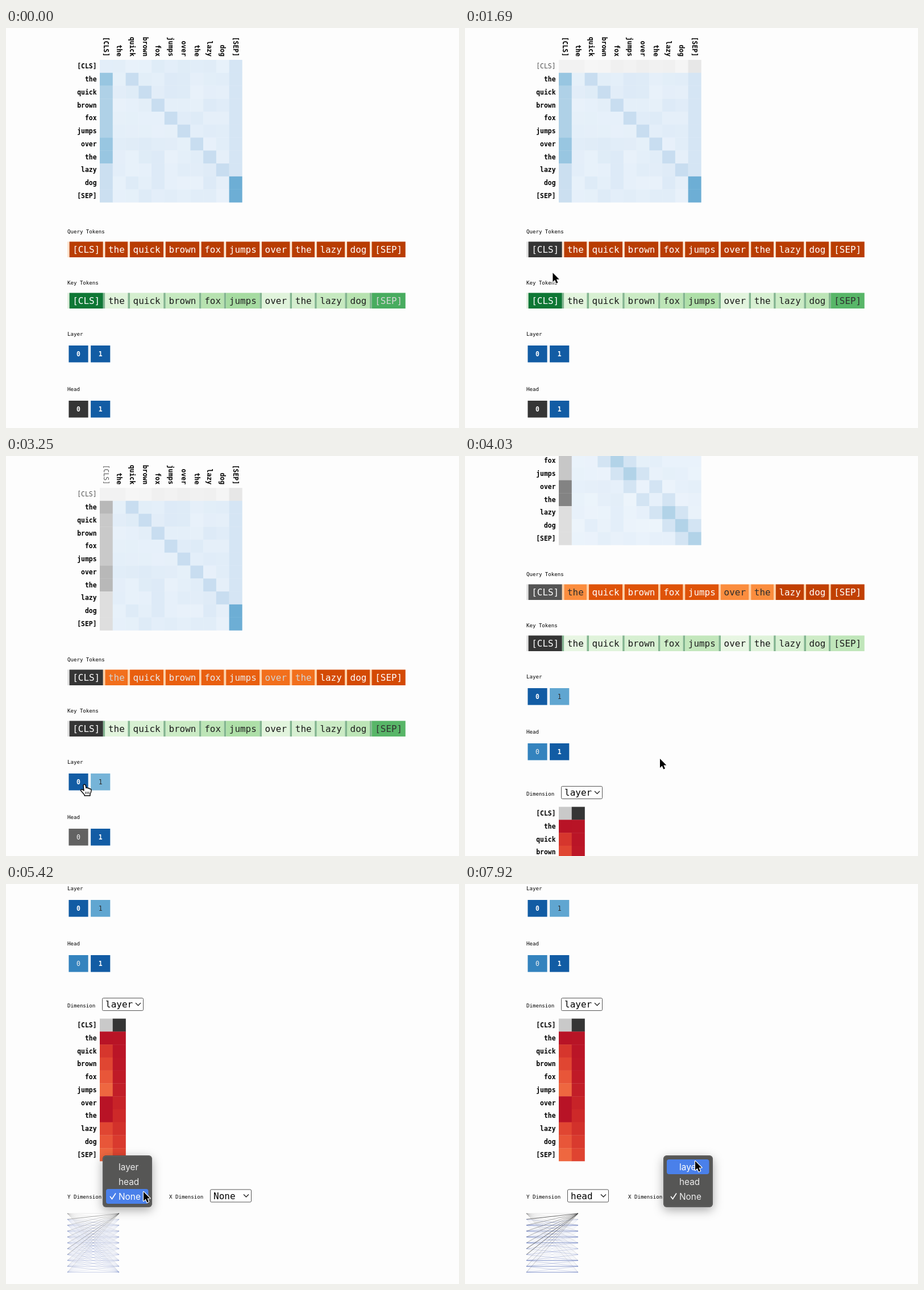
Write an HTML page with a canvas that moves like this. It is 797 by 703 pixels and loops after 8000 ms.

```html
<!DOCTYPE html>
<html lang="en">
<head>
<meta charset="utf-8">
<title>Attention explorer</title>
<style>
  html, body { margin: 0; width: 100%; height: 100%; overflow: hidden; background: #fdfdfd; }
  canvas { display: block; }
</style>
</head>
<body>
<canvas id="stage" width="797" height="703"></canvas>
<script>
const ctx = document.getElementById('stage').getContext('2d');
const LOOP = 8000, CELL = 22.76, MAX = 0.83;
const TOKENS = '[CLS] the quick brown fox jumps over the lazy dog [SEP]'.split(' ');
const LAST = TOKENS.length - 1;
const MONO = '"DejaVu Sans Mono", monospace';

// Colour scales, interpolated with a uniform B-spline
const SCALES = Object.fromEntries(Object.entries({
  blue: 'f7fbff deebf7 c6dbef 9ecae1 6baed6 4292c6 2171b5 08519c 08306b',
  green: 'f7fcf5 e5f5e0 c7e9c0 a1d99b 74c476 41ab5d 238b45 006d2c 00441b',
  orange: 'fff5eb fee6ce fdd0a2 fdae6b fd8d3c f16913 d94801 a63603 7f2704',
  red: 'd9ef8b ffffbf fee08b fdc776 fdae61 f46d43 d73027 a50026 8a0020',
  grey: 'ffffff f0f0f0 d9d9d9 bdbdbd 969696 737373 525252 252525 000000'
}).map(([name, stops]) => [name, stops.split(' ').map(hex =>
  [0, 2, 4].map(k => parseInt(hex.slice(k, k + 2), 16)))]));

function shade(name, v) {
  const stops = SCALES[name], k = Math.min(7, Math.floor(v * 8)), u = v * 8 - k;
  const channel = c => {
    const b = stops[k][c], d = stops[k + 1][c];
    const a = k ? stops[k - 1][c] : 2 * b - d, e = k < 7 ? stops[k + 2][c] : 2 * d - b;
    return Math.round(((1 - u) ** 3 * a + (4 - 6 * u * u + 3 * u ** 3) * b
      + (1 + 3 * u + 3 * u * u - 3 * u ** 3) * d + u ** 3 * e) / 6);
  };
  return `rgb(${[0, 1, 2].map(channel)})`;
}

function textShade(v) {
  const g = v < 0.595 ? 15 + v * 60 : Math.min(255, 205 + (v - 0.595) * 420);
  return `rgb(${g},${g},${g})`;
}

const noise = (a, b) => { const s = Math.sin(a * 12.99 + b * 78.23) * 43758.5; return s - Math.floor(s); };
const isFunctionWord = i => ['the', 'over'].includes(TOKENS[i]);
const clausePlace = i => i < 6 ? i - 1 : i - 6;

// How much each token attends to the first one
function sink(i, both) {
  if (!i) return both ? .3 : .1;
  if (i > 7) return .22;
  return isFunctionWord(i) ? (both ? .57 : .385) : (both ? .33 : .32);
}

// One head looks at the next token; together they also look at the token itself and its neighbours
function oneHead(i, j) {
  if (!j) return sink(i, false);
  if (j === LAST) return i > 8 ? .5 : .17;
  return i && j === i + 1 ? .23 : .075 + .06 * noise(i + 1, j);
}
function bothHeads(i, j) {
  if (!j) return sink(i, true);
  if (i && j === i && !isFunctionWord(i)) return .31;
  return i && Math.abs(i - j) === 1 ? .18 : .055 + .05 * noise(i + 1, j);
}

const queryValue = (i, both) => Math.min(MAX, (both ? 1 : .945) - .88 * sink(i, both));
function keyValue(i, both) {
  if (!i) return MAX;
  if (i === LAST) return both ? .27 : .57;
  return both ? .1 + .04 * clausePlace(i) : .13 + .05 * clausePlace(i);
}
function layerValue(i, layer) {
  if (!i) return layer ? MAX : .32;
  if (layer) return MAX - .0012 * i * i;
  return isFunctionWord(i) ? MAX : .775 - .034 * clausePlace(i);
}

// Pointer stops: place and time of arrival; a repeated place is a pause
const PLACE = {
  start: [180, 425], queryCls: [157, 384], keyCls: [152, 474], keyQuick: [245, 476],
  layer0: [138, 577], head0: [132, 662], blank: [343, 532],
  ySelect: [242, 541], headItem: [243, 516], xSelect: [412, 542], layerItem: [405, 487]
};
const STOPS = Object.entries({
  20: 'start', 250: 'queryCls', 560: 'keyCls', 840: 'keyQuick', 1250: 'keyCls', 2150: 'queryCls',
  2650: 'queryCls', 2910: 'keyCls', 3250: 'layer0', 3430: 'head0', 3800: 'blank', 4760: 'blank',
  5150: 'ySelect', 5480: 'ySelect', 5900: 'headItem', 6800: 'xSelect', 7350: 'xSelect', 7850: 'layerItem'
}).map(([time, name]) => [+time, PLACE[name]]);

const smooth = p => { p = Math.max(0, Math.min(1, p)); return p * p * (3 - 2 * p); };
const within = (t, from, to) => t >= from && t < to;

function pointerAt(t) {
  const k = STOPS.findIndex(([time]) => time > t);
  if (k < 1) return STOPS.at(k)[1];
  const [t0, from] = STOPS[k - 1], [t1, to] = STOPS[k];
  const e = smooth((t - t0) / (t1 - t0));
  return from.map((a, n) => a + (to[n] - a) * e);
}

function text(str, x, y, size, color = '#000', { bold, align = 'left', family = MONO } = {}) {
  ctx.font = `${bold ? 'bold ' : ''}${size}px ${family}`;
  ctx.textAlign = align;
  ctx.fillStyle = color;
  ctx.fillText(str, x, y);
}
const caption = (str, x, y) => text(str, x, y, 9.1);

function rect(x, y, w, h, color) {
  ctx.fillStyle = color;
  ctx.fillRect(x, y, w, h);
}

function rounded(x, y, w, h, r, fill, stroke) {
  ctx.beginPath();
  ctx.roundRect(x, y, w, h, r);
  ctx.fillStyle = fill;
  ctx.fill();
  if (stroke) { ctx.strokeStyle = stroke; ctx.lineWidth = 1; ctx.stroke(); }
}

function polyline(points, color, width) {
  ctx.beginPath();
  points.forEach(([x, y]) => ctx.lineTo(x, y));
  ctx.strokeStyle = color;
  ctx.lineWidth = width;
  ctx.stroke();
}

function label(token, x, y, off) {
  text(token, x, y, 11.4, off ? '#555' : '#000', { bold: !off, align: 'right' });
}
const rowLabels = (top, firstOff) =>
  TOKENS.forEach((token, i) => label(token, 159.5, top + (i + .5) * CELL + 4, firstOff && !i));
const cell = (i, j, top, color) =>
  rect(165 + j * CELL, top + i * CELL, CELL + .3, CELL + .3, color);

function heatmap(weight, queryOff, keyOff) {
  rowLabels(56, queryOff);
  TOKENS.forEach((token, j) => {
    ctx.save();
    ctx.translate(165 + (j + .5) * CELL - 4, 50);
    ctx.rotate(Math.PI / 2);
    label(token, 0, 0, keyOff && !j);
    ctx.restore();
    TOKENS.forEach((_, i) => {
      const grey = (queryOff && !i) || (keyOff && !j);
      cell(i, j, 56, shade(grey ? 'grey' : 'blue', weight(i, j)));
    });
  });
}

function tokenRow(y, scale, valueOf, firstOff, borderOf) {
  let x = 108;
  TOKENS.forEach((token, i) => {
    const v = valueOf(i), w = token.length * 9.6 + 14.8, off = firstOff && !i;
    rect(x, y, 3.6, 27.5, off ? '#e2e2e2' : borderOf(i));
    rect(x + 3.6, y, w - 3.6, 27.5, shade(off ? 'grey' : scale, v));
    text(token, x + 9.2, y + 19, 15.94, textShade(v));
    x += w;
  });
}

function buttons(y, values, firstOff) {
  values.forEach((v, i) => {
    const x = 110.4 + i * 38.7;
    rect(x, y, 34.2, 29.6, shade(firstOff && !i ? 'grey' : 'blue', v));
    text(i, x + 17.1, y + 18.8, 11.4, textShade(v), { bold: v > .75, align: 'center' });
  });
}

function select(x, y, value) {
  rounded(x + .5, y + .5, 72, 22, 2, '#fff', '#555');
  text(value, x + 6, y + 17.3, 16);
  polyline([[x + 59, y + 9], [x + 63.5, y + 13.5], [x + 68, y + 9]], '#222', 1.3);
}

function menu(x, pointerY) {
  const y = 477;
  ctx.save();
  ctx.shadowColor = 'rgba(0,0,0,.34)';
  ctx.shadowBlur = 18;
  ctx.shadowOffsetY = 5;
  rounded(x, y, 87, 91, 6, '#3c3c3c');
  ctx.restore();
  rounded(x + 1, y + 1, 85, 89, 5, '#565655', '#6c6c6c');
  const active = Math.max(0, Math.min(2, Math.floor((pointerY - 484) / 26)));
  rounded(x + 6, y + 7 + active * 26, 74.5, 26, 4, '#4a80ea');
  ['layer', 'head', 'None'].forEach((item, i) =>
    text(item, x + 28, y + 25.5 + i * 26, 15.4, i === active ? '#fff' : '#ececec', { family: 'Inter, sans-serif' }));
  polyline([[x + 13, 549], [x + 16.5, 553.5], [x + 23, 543.5]], '#fff', 1.6);
}

function connections(grouped) {
  const top = 1109, step = 10.33;
  TOKENS.forEach((_, i) => TOKENS.forEach((_, j) => {
    const w = bothHeads(i, j), grey = !i || !j;
    let alpha = grouped ? Math.max(.04, (w - .1) * 3.2) : w + (j === LAST ? .1 : .03);
    if (grey) alpha = i ? w * (grouped ? 1.25 : .9) : .13;
    polyline([[108, top + i * step], [199, top + j * step]],
      `rgba(${grey ? '60,60,60' : '75,100,180'},${Math.min(.8, alpha)})`, grouped ? 1 : .75);
  }));
}

const HAND = new Path2D('M-2 1.5Q0-1 2 1.5L3 6.5Q5 5 6 7Q8 6 9 8Q12 7.5 12 10.5Q12 14 10 16.5V20H0V18.5Q-2 16-6.5 11Q-6.5 8-3 9.5L-1 11Z');
const KNUCKLES = new Path2D('M2.2 13V17M5 13V17M7.8 13V17');
const ARROW = new Path2D('M0 0V16L3.7 12.4L6.3 18.4L9 17.2L6.4 11.4H11.4Z');

function pointer(x, y, scroll) {
  const pageY = y + scroll;
  const overRow = x > 108 && x < 703 && (within(pageY, 375, 403) || within(pageY, 465, 493));
  const overButton = x > 110 && x < 183 && (within(pageY, 558, 588) || within(pageY, 655, 685));
  ctx.save();
  ctx.translate(x, y);
  ctx.lineJoin = 'round';
  if (overRow || overButton) {
    ctx.fillStyle = '#fff';
    ctx.strokeStyle = '#000';
    ctx.lineWidth = 1.4;
    ctx.fill(HAND);
    ctx.stroke(HAND);
    ctx.lineWidth = 1;
    ctx.stroke(KNUCKLES);
  } else {
    ctx.strokeStyle = '#fff';
    ctx.lineWidth = 2.4;
    ctx.stroke(ARROW);
    ctx.fillStyle = '#000';
    ctx.fill(ARROW);
  }
  ctx.restore();
}

function draw(t) {
  const queryOff = within(t, 280, 2150) || t >= 2650;
  const keyOff = within(t, 560, 1250) || t >= 2910;
  const both = t >= 3440;
  const grouped = t >= 5950;
  const scroll = Math.round(530 * smooth((t - 3650) / 1086));
  const [px, py] = pointerAt(t);

  rect(0, 0, 797, 703, '#fdfdfd');
  ctx.save();
  ctx.translate(0, -scroll);
  heatmap(both ? bothHeads : oneHead, queryOff, keyOff);

  caption('Query Tokens', 108, 361);
  tokenRow(375.5, 'orange', i => keyOff ? queryValue(i, both) : MAX, queryOff,
    () => keyOff ? '#fdd0a6' : '#fce4d0');
  caption('Key Tokens', 108, 451);
  tokenRow(465.5, 'green', i => Math.min(MAX, keyValue(i, both) * (queryOff ? 1 : 1.08)), keyOff,
    i => !i ? '#e2efdf' : '#83b590');

  caption('Layer', 108, 541);
  buttons(558, [MAX, !keyOff ? MAX : both ? .535 : .475]);
  caption('Head', 108, 638);
  buttons(655, [both ? .68 : keyOff ? .69 : MAX, MAX], !both);

  caption('Dimension', 108, 746.5);
  select(169, 730, 'layer');
  rowLabels(766.6, false);
  TOKENS.forEach((_, i) => [0, 1].forEach(layer =>
    cell(i, layer, 766.6, shade(i ? 'red' : 'grey', layerValue(i, layer)))));

  caption('Y Dimension', 108, 1083);
  select(180, 1066.5, grouped ? 'head' : 'None');
  caption('X Dimension', 287, 1083);
  select(359, 1066.5, 'None');
  connections(grouped);
  ctx.restore();

  if (within(t, 5250, 5950)) menu(170, py);
  if (t >= 7050) menu(349, py);
  if (t >= 20) pointer(px, py, scroll);
}

const start = performance.now();
function tick() {
  draw((performance.now() - start) % LOOP);
  requestAnimationFrame(tick);
}
tick();
</script>
</body>
</html>
```
